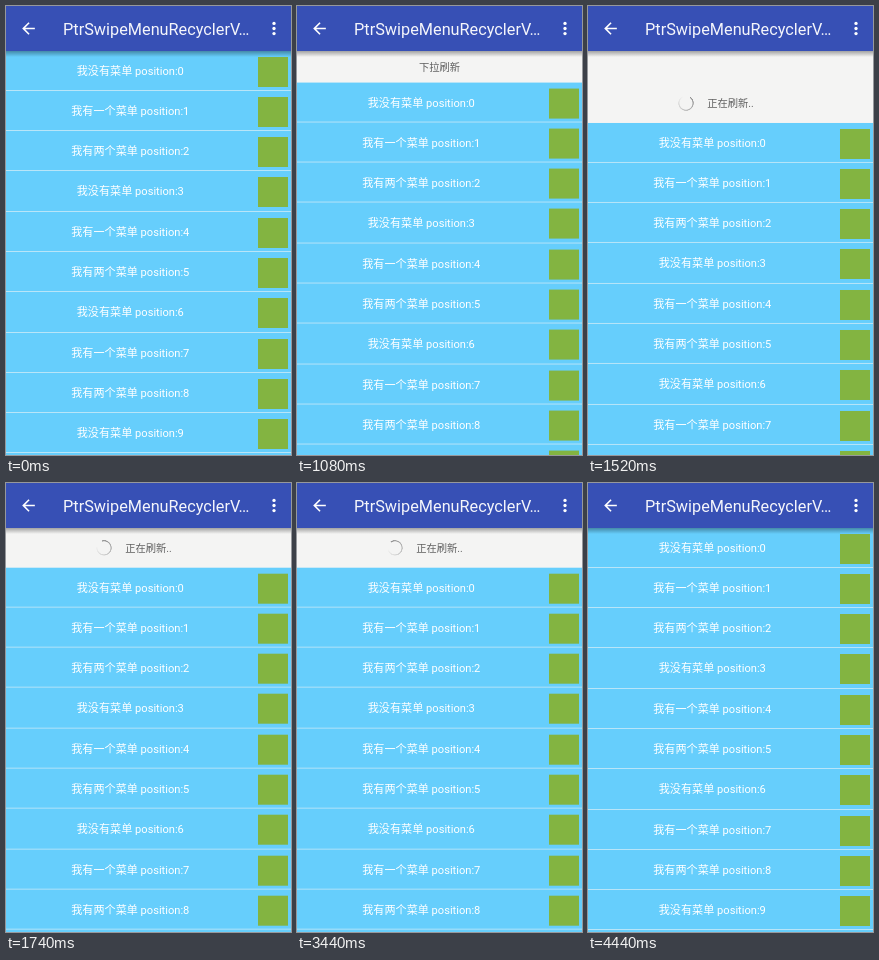
These frames come from a looping animation (285x449 px, 4.79 s). An HTML page:

```html
<!DOCTYPE html>
<html lang="zh">
<head>
<meta charset="utf-8">
<style>
html, body { margin: 0; width: 100%; height: 100%; overflow: hidden; }
body { position: relative; background: #f4f4f3; font: 11.12px/41.6px Roboto, "Noto Sans CJK SC", "Noto Sans CJK", sans-serif; }
#bar { position: absolute; left: 0; top: 0; width: 285px; height: 44.5px; background: #3750b5; }
#bar::after { content: ""; position: absolute; top: 100%; width: 100%; height: 6px; background: linear-gradient(#0005, #0000); }
#bar svg { position: absolute; left: 0; top: 0; fill: #fff; }
#title { position: absolute; left: 57px; top: 0; font-size: 16.28px; line-height: 48px; color: #f4f5fb; white-space: nowrap; }
#list, #head { position: absolute; left: 0; top: 44.7px; width: 285px; }
.row { position: relative; height: 39.27px; background: #66cefc; border-bottom: 1px solid #b8e5f8; color: #fff; }
.row span { display: block; width: 248.6px; text-align: center; white-space: nowrap; }
.row i { position: absolute; left: 251.5px; top: 6px; width: 30px; height: 30px; background: #83b441; }
#head { height: 40px; margin-top: -20px; text-align: center; font-size: 10.3px; color: #606060; }
#spin {
  position: absolute; left: 90px; top: 12px; width: 16px; height: 16px; border-radius: 50%;
  background: conic-gradient(#909090, #9090 300deg);
  -webkit-mask: radial-gradient(circle, #0000 6.2px, #000 6.8px, #000 7.6px, #0000 8px);
  mask: radial-gradient(circle, #0000 6.2px, #000 6.8px, #000 7.6px, #0000 8px);
}
</style>
</head>
<body>
<div id="head"><div id="spin"></div><span id="label"></span></div>
<div id="list"></div>
<div id="bar">
  <svg width="285" height="44">
    <path transform="translate(13 13) scale(.792)" d="M20 11H7.83l5.59-5.59L12 4l-8 8 8 8 1.41-1.41L7.83 13H20z"/>
    <circle cx="268" cy="17.4" r="1.65"/><circle cx="268" cy="22.5" r="1.65"/><circle cx="268" cy="27.6" r="1.65"/>
  </svg>
  <div id="title">PtrSwipeMenuRecyclerV…</div>
</div>
<script>
const $ = id => document.getElementById(id);
const LOOP = 4790, REST = 39.7, PEAK = 80;
const PULL = 970, RELEASE = 1500, CLOSE = 4115;
const kinds = ['我没有菜单', '我有一个菜单', '我有两个菜单'];

$('list').innerHTML = Array.from({ length: 11 }, (_, i) =>
  `<div class="row"><span>${kinds[i % 3]} position:${i}</span><i></i></div>`).join('');

const part = (t, start, length) => Math.min(1, Math.max(0, (t - start) / length));
const easeOut = p => 1 - (1 - p) ** 2;
const easeInOut = p => (1 - Math.cos(Math.PI * p)) / 2;

function offset(t) {
  if (t < RELEASE) return PEAK * easeOut(part(t, PULL, 500));
  if (t < CLOSE) return PEAK + (REST - PEAK) * easeOut(part(t, RELEASE, 200));
  return REST * (1 - easeInOut(part(t, CLOSE, 186)));
}

function draw() {
  const t = performance.now() % LOOP, d = offset(t), loading = t >= RELEASE;
  $('list').style.transform = `translateY(${d}px)`;
  $('head').style.transform = `translateY(${d - Math.min(d, REST) / 2}px)`;
  $('label').textContent = loading ? '正在刷新..' : d > REST ? '放开刷新' : '下拉刷新';
  $('spin').style.display = loading ? '' : 'none';
  $('spin').style.transform = `rotate(${-90 - (t - 2070) * 0.226}deg)`;
  requestAnimationFrame(draw);
}
draw();
</script>
</body>
</html>
```
